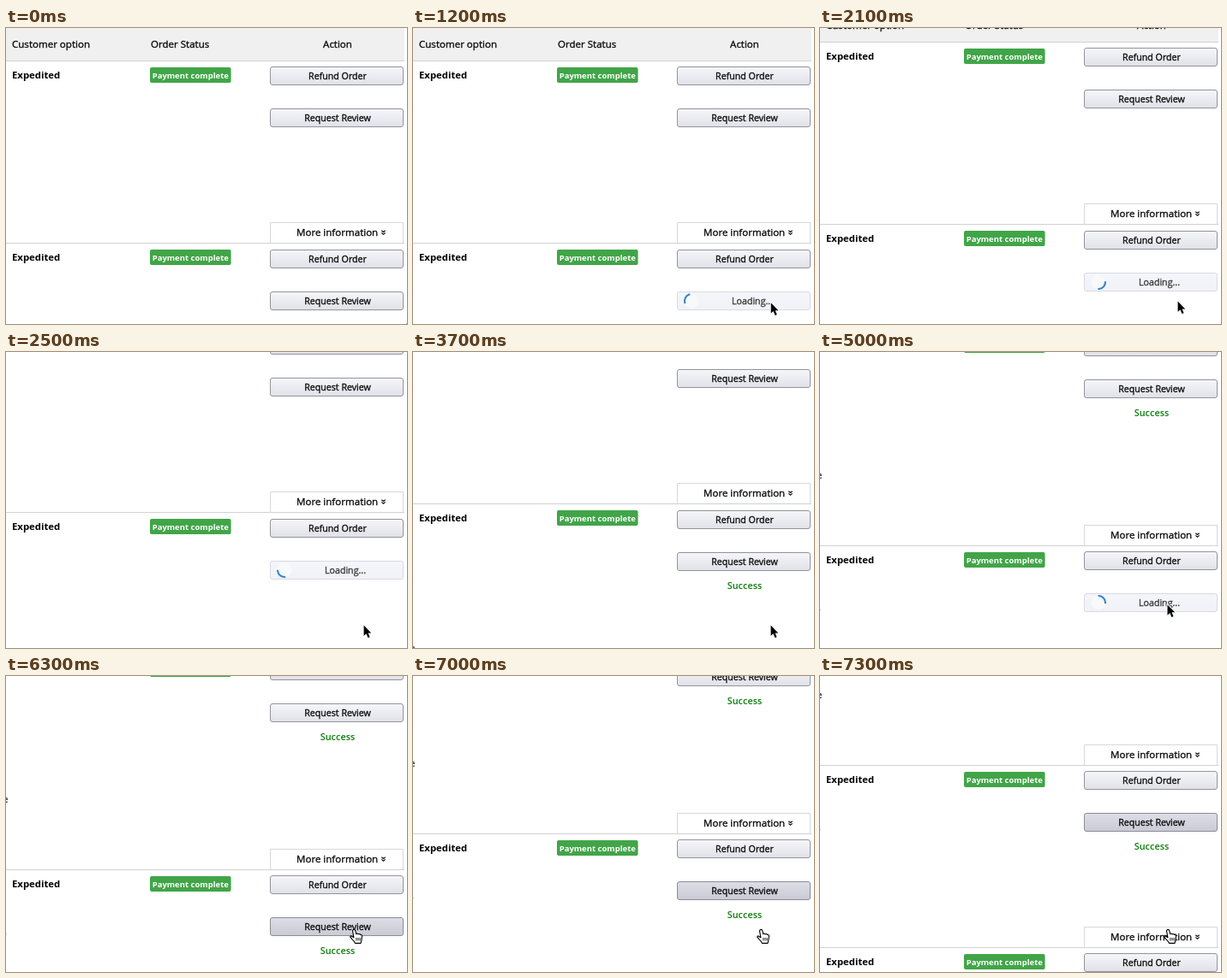
Animation, 468 px wide and 346 px high, one loop 7.4 s. Source, as an HTML page with a canvas:

```html
<!DOCTYPE html>
<html lang="en">
<head>
<meta charset="utf-8">
<title>Order list</title>
<style>
html, body { margin: 0; height: 100%; overflow: hidden; background: #fff; }
canvas { display: block; }
</style>
</head>
<body>
<canvas id="stage" width="468" height="346"></canvas>
<script>
const ctx = document.getElementById('stage').getContext('2d');
const LOOP = 7400, STEP = 100;
const LEFT = 308, RIGHT = 464, MIDDLE = 387;
const ROW_TOPS = [38, 251.4, 502, 715, 928];

// Keyframes: time, value(s)
const SCROLL = [[1600, 0], [1800, 3], [2100, 22], [2300, 46], [2500, 64], [2700, 71], [2900, 74],
  [3700, 74], [3800, 84], [4000, 170], [4200, 250], [4400, 276],
  [6800, 276], [6900, 284], [7000, 318], [7150, 372], [7300, 398]];
const POINTER = [[0, 467.5, 345], [700, 418, 324], [900, 418, 324], [1400, 417.6, 319.5],
  [4000, 417.6, 319.5], [4400, 410, 304], [4600, 405.5, 295.4]];

// Request buttons that get clicked, by row
const REQUESTS = {
  1: { load: 900, done: 2700, hover: [600, 900] },
  2: { load: 4700, done: 6100, hover: [6200, LOOP] }
};

const ARROW = new Path2D('M0 0V12.3L2.8 9.7L4.9 14.6L7 13.7L5 8.9H8.7Z');
const HAND = new Path2D('M-1 2.5Q-.5 .8 .8 1Q2 1 2.4 2.8L3.2 6.2Q4.5 5 5.6 6.5Q7 5.5 8 7' +
  'Q10 6.5 10 8.7L9.5 13L8.5 17H2Q1 14.5 -1.5 12.5L-3.8 9.5Q-3.5 8 -1.9 8.8L.4 10.3Z');
const PALM = new Path2D('M3.4 10.5V14M5.5 10.5V14M7.6 10.5V14');

const within = (t, [from, to]) => t >= from && t < to;

function sample(keys, t) {
  const next = keys.findIndex(key => key[0] > t);
  if (next === 0) return keys[0].slice(1);
  if (next < 0) return keys[keys.length - 1].slice(1);
  const a = keys[next - 1], b = keys[next], k = (t - a[0]) / (b[0] - a[0]);
  return a.slice(1).map((v, i) => v + (b[i + 1] - v) * k);
}

// A thin outline gives regular text a medium weight
function text(label, x, baseline, { size = 11.55, weight = 400, color = '#0c0c0c', align = 'left' } = {}) {
  ctx.font = `${weight} ${size}px "Open Sans", sans-serif`;
  ctx.textAlign = align;
  ctx.fillStyle = ctx.strokeStyle = color;
  ctx.fillText(label, x, baseline);
  if (weight === 400) {
    ctx.lineWidth = .35;
    ctx.lineJoin = 'round';
    ctx.strokeText(label, x, baseline);
  }
}

function rect(x, y, w, h, color) {
  ctx.fillStyle = color;
  ctx.fillRect(x, y, w, h);
}

function roundRect(x, y, w, h, r) {
  ctx.beginPath();
  ctx.roundRect(x, y, w, h, r);
}

const BUTTON_LOOK = {
  normal: ['#f6f6fa', '#e0e1e8', '#92949c', '#0c0c0c'],
  hover: ['#dddee6', '#c9cad5', '#8b8d96', '#0c0c0c'],
  disabled: ['#f5f6fa', '#f1f2f7', '#d9dbe2', '#3c3c3c']
};

function button(label, center, look = 'normal') {
  const [top, bottom, border, color] = BUTTON_LOOK[look];
  const fill = ctx.createLinearGradient(0, center - 11, 0, center + 11);
  fill.addColorStop(0, top);
  fill.addColorStop(1, bottom);
  roundRect(LEFT + .5, center - 10.5, RIGHT - LEFT - 1, 21, 2.5);
  ctx.fillStyle = fill;
  ctx.fill();
  ctx.strokeStyle = border;
  ctx.lineWidth = 1;
  ctx.stroke();
  text(label, look === 'disabled' ? 396 : MIDDLE, center + 4, { size: 10.65, color, align: 'center' });
}

function spinner(x, y, t) {
  const start = (t - 2100) / 1650 * 2 * Math.PI - .1;
  ctx.beginPath();
  ctx.arc(x, y, 8.5, 0, 7);
  ctx.fillStyle = '#f8f9fb';
  ctx.fill();
  ctx.beginPath();
  ctx.arc(x, y, 8, start, start + 1.75);
  ctx.strokeStyle = '#3586c6';
  ctx.lineWidth = 2.1;
  ctx.stroke();
}

function moreInformation(bottom) {
  ctx.strokeStyle = '#d8d8d8';
  ctx.lineWidth = 1;
  ctx.strokeRect(LEFT + .5, bottom - 23.5, RIGHT - LEFT - 1, 24);
  text('More information', 339, bottom - 8);
  ctx.beginPath();
  for (const y of [bottom - 14.3, bottom - 11.6]) {
    ctx.moveTo(438.3, y);
    ctx.lineTo(440.5, y + 1.8);
    ctx.lineTo(442.7, y);
  }
  ctx.strokeStyle = '#111';
  ctx.lineWidth = 1.2;
  ctx.stroke();
}

function row(index, t) {
  const top = ROW_TOPS[index], bottom = Math.floor(ROW_TOPS[index + 1]);
  const request = REQUESTS[index];
  const refundY = Math.round(top + 18.2), requestY = Math.round(top + 67.2);
  const labelY = Math.round(top + 21), badgeY = Math.round(top + 8);

  text('Expedited', 7, labelY, { size: 11.35, weight: 700, color: '#000' });
  roundRect(168, badgeY, 94.6, 18, 2);
  ctx.fillStyle = '#41a548';
  ctx.fill();
  text('Payment complete', 215.3, labelY, { size: 9.5, weight: 700, color: '#fff', align: 'center' });

  button('Refund Order', refundY);
  if (request && within(t, [request.load, request.done])) {
    button('Loading...', requestY, 'disabled');
    spinner(325, requestY, t);
  } else {
    button('Request Review', requestY, request && within(t, request.hover) ? 'hover' : 'normal');
  }
  if (request && t >= request.done) {
    text('Success', MIDDLE, requestY + 32, { size: 10.9, weight: 600, color: '#0a7d0a', align: 'center' });
  }
  moreInformation(bottom);
  rect(0, bottom, 465, 1, '#d2d2d2');
}

function pointer(t) {
  const hand = within(t, [600, 900]) || within(t, [4500, 4700]) || t >= 6200;
  ctx.save();
  ctx.translate(...sample(POINTER, t));
  ctx.lineJoin = 'round';
  ctx.lineWidth = hand ? 1.1 : 2;
  ctx.strokeStyle = hand ? '#000' : '#fff';
  ctx.fillStyle = hand ? '#fff' : '#000';
  if (hand) {
    ctx.fill(HAND);
    ctx.stroke(HAND);
    ctx.lineWidth = .9;
    ctx.stroke(PALM);
  } else {
    ctx.stroke(ARROW);
    ctx.fill(ARROW);
  }
  ctx.restore();
}

function draw(t) {
  rect(0, 0, 468, 346, '#fff');
  ctx.save();
  ctx.translate(0, -Math.round(sample(SCROLL, t)[0]));
  rect(0, 0, 465, 38, '#f0f0f0');
  rect(0, 38, 465, 1, '#d2d2d2');
  text('Customer option', 7, 23);
  text('Order Status', 169, 23);
  text('Action', MIDDLE, 23, { align: 'center' });
  for (let i = 0; i < 4; i++) row(i, t);

  // Right edge of the neighbouring column
  text('e', 2.5, 424, { size: 11, align: 'right', color: '#333' });
  rect(0, 577, .6, 1, '#999');
  ctx.restore();
  pointer(t);
}

function frame(now) {
  draw(Math.floor(now % LOOP / STEP) * STEP);
  requestAnimationFrame(frame);
}
requestAnimationFrame(frame);
</script>
</body>
</html>
```
